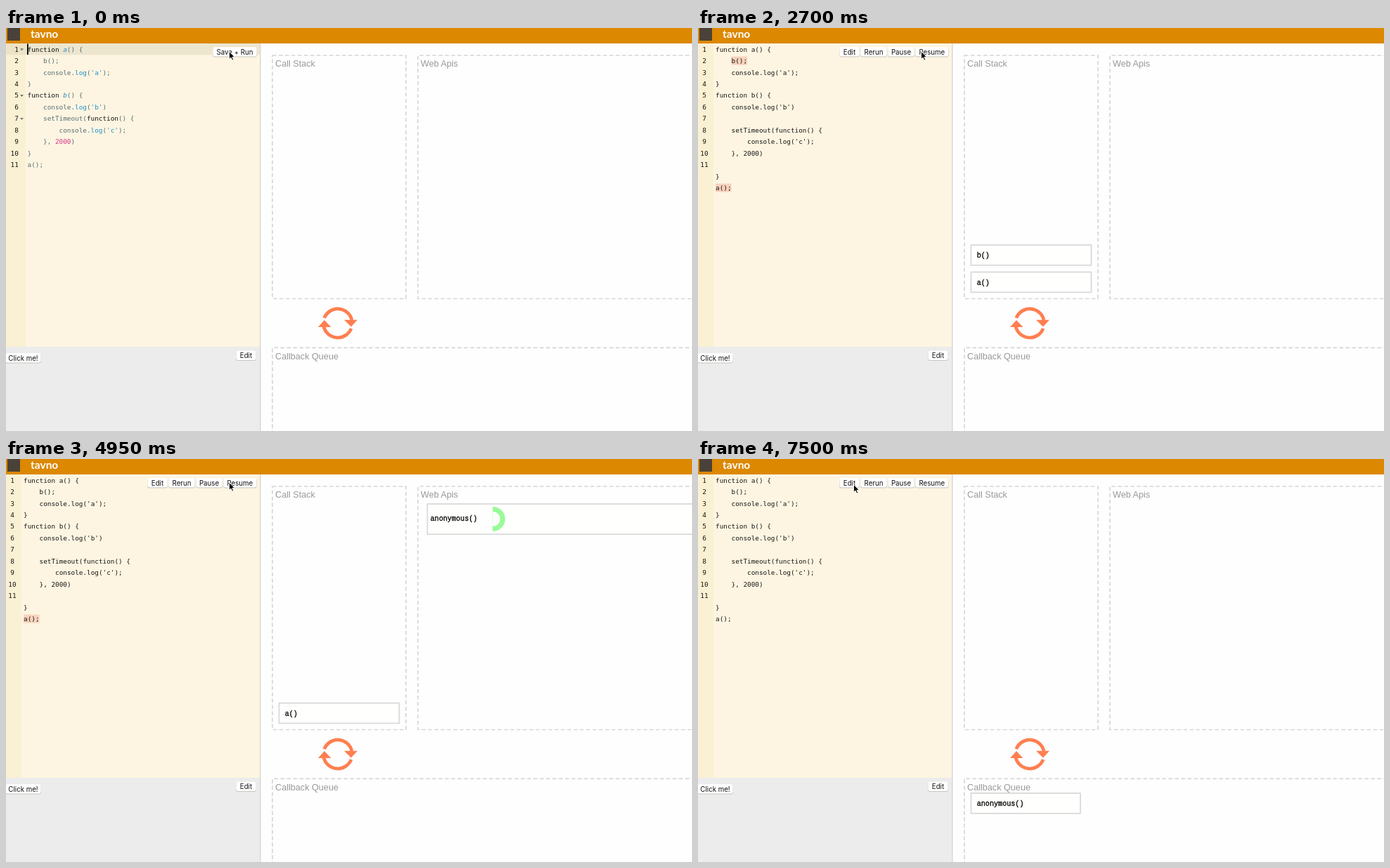
Recreate the animation shown at these times as an HTML page. Size 976 by 574 pixels, loop 8000 ms.

```html
<!DOCTYPE html>
<html lang="en">
<head>
<meta charset="utf-8">
<title>Event loop</title>
<style>
  html, body { margin: 0; width: 976px; height: 574px; overflow: hidden; background: #fefefe; }
  svg { display: block; }
  text { white-space: pre; }
  .code { font: 9.36px "DejaVu Sans Mono", monospace; fill: #151515; }
  .edit { fill: #586e75; }
  .edit .k { fill: #111; }
  .edit .n { fill: #268bd2; font-style: italic; }
  .edit .s { fill: #1f8fd0; }
  .edit .d { fill: #d8308a; }
  .button { font: 9.7px Inter, sans-serif; fill: #111; text-anchor: middle; }
  .title { font: 12.65px "Liberation Sans", Arial, sans-serif; fill: #999; }
  .call { font: 10.15px "Liberation Mono", monospace; fill: #000; stroke: #000; stroke-width: .3; }
  .brand { font: bold 15.5px Lato, sans-serif; fill: #fff; }
  .dashed { fill: none; stroke: #d6d6d6; stroke-width: 1.7; stroke-dasharray: 5.6 3.4; }
  .box { stroke: #d8d8d8; stroke-width: 1.7; }
</style>
</head>
<body>
<svg id="stage" width="976" height="574" viewBox="0 0 976 574"></svg>
<script>
const LOOP = 8000, STEP = 150;
const ROW = 16.45, CHAR = 5.635;
const rowY = i => 30.2 + i * ROW;

const editorCode = [
  "<k>function</k> <n>a</n>() {",
  "    b();",
  "    console.<s>log</s>(<s>'a'</s>);",
  "}",
  "<k>function</k> <n>b</n>() {",
  "    console.<s>log</s>(<s>'b'</s>)",
  "    setTimeout(<k>function</k>() {",
  "        console.<s>log</s>(<s>'c'</s>);",
  "    }, <d>2000</d>)",
  "}",
  "a();"
].map(line => line.replace(/<(\w)>/g, '<tspan class="$1">').replace(/<\/\w>/g, "</tspan>"));

const plainCode = editorCode.map(line => line.replace(/<[^>]+>/g, ""));
plainCode.splice(9, 0, "");
plainCode.splice(6, 0, "");

// marks: [row, first column, last column]; lag: age of the yellow flash on appearing
const calls = [
  { from: 150, to: 7050, lag: 150, y: 347.6, lines: ["a()"], marks: [[12, 0, 4]] },
  { from: 1050, to: 4800, lag: 150, y: 309.1, lines: ["b()"], marks: [[1, 4, 8]] },
  { from: 1800, to: 2550, lag: 300, y: 270.6, lines: ["console.log('b')"], marks: [[5, 4, 20], [7, 0, 4]] },
  { from: 3300, to: 4050, lag: 300, y: 247.2, lines: ["setTimeout(function() {", "console.log('c'); },", "2000)"],
    marks: [[7, 4, 27], [8, 0, 25], [9, 0, 12]] },
  { from: 5550, to: 6150, lag: 150, y: 309.1, lines: ["console.log('a')"], marks: [[2, 4, 21]] },
  { from: 6000, to: LOOP, lag: 0, y: 476, w: 155.5, lines: ["anonymous()"], marks: [] }
];
const TIMER = { from: 4050, to: 6000, start: 3945, span: 2000, x: 692.5, y: 85.5 };

const rect = (x, y, w, h, fill, extra = "") =>
  `<rect x="${x}" y="${y}" width="${w}" height="${h}" fill="${fill}" ${extra}/>`;
const text = (x, y, cls, str) => `<text x="${x}" y="${y}" class="${cls}">${str}</text>`;
const flash = age => `rgb(255,255,${Math.min(253, 210 + age * 0.14)})`;
const active = (item, t) => t >= item.from && t < item.to;

function button(x, y, w, label) {
  return rect(x, y + 0.8, w, 13.4, "#c9c5bd", 'rx="3"') + rect(x + 0.4, y, w - 0.8, 13.3, "#fff", 'rx="3"') +
    text(x + w / 2, y + 10.2, "button", label);
}

function gutterAndCode(t) {
  const editing = t < 150;
  let out = rect(0, 22, editing ? 28 : 22, 432, "#faf0d3");
  if (editing) out += rect(28, 22, 333, 16.4, "#ede6cf") + rect(0, 22, 28, 16.4, "#ede3c6");
  for (let i = 0; i < 11; i++) {
    const n = String(i + 1);
    const x = editing ? 17.8 - n.length * CHAR : 9 - n.length * CHAR / 2;
    out += text(x, rowY(i) + 3.4, "code", n);
  }
  if (!editing) {
    for (const call of calls) if (active(call, t))
      for (const [row, a, b] of call.marks)
        out += rect(25 + a * CHAR, rowY(row) - 6, (b - a) * CHAR, 12, "#f8d2bc");
  }
  const code = editing ? editorCode : plainCode;
  code.forEach((line, i) => out += text(editing ? 30.5 : 25, rowY(i) + 3.4, editing ? "code edit" : "code", line));
  if (editing) {
    for (const i of [0, 4, 6]) out += `<path d="M20 ${rowY(i) - 1}h5l-2.5 3z" fill="#777"/>`;
    out += rect(30, 22.5, 1.8, 15.5, "#000") + button(294, 27.3, 63, "Save + Run");
  } else {
    out += button(201, 27.3, 29, "Edit") + button(231, 27.3, 38, "Rerun") +
      button(270, 27.3, 38, "Pause") + button(309, 27.3, 47.5, "Resume");
  }
  return out;
}

function callBox(call, t) {
  const leaving = t >= call.to && t < call.to + STEP;
  if (!active(call, t) && !leaving) return "";
  const h = 28.8 + (call.lines.length - 1) * 11.7;
  return `<g opacity="${leaving ? 0.35 : 1}">` +
    rect(388.5, call.y, call.w || 171, h, flash(t - call.from + call.lag), 'class="box"') +
    call.lines.map((line, i) => text(396.7, call.y + 18.2 + i * 11.7, "call", line)).join("") + "</g>";
}

function timerBox(t) {
  if (!active(TIMER, t)) return "";
  const { x, y } = TIMER;
  const angle = (t - TIMER.start) / TIMER.span * 2 * Math.PI;
  const sector = (r, fill) => `<path fill="${fill}" d="M${x} ${y}v${-r}A${r} ${r} 0 ${+(angle > Math.PI)} 1
    ${x + r * Math.sin(angle)} ${y - r * Math.cos(angle)}z"/>`;
  return rect(599.5, 64, 400, 43.2, flash(t - TIMER.from), 'class="box"') +
    text(603.8, 88, "call", "anonymous()") +
    `<path d="M${x} ${y - 17.6}a17.6 17.6 0 0 0 0 35.2z" fill="#fefefe"/>` +
    sector(17.6, "#98fb98") + sector(10.6, "#fefefe");
}

function pointer(t) {
  const p = Math.max(0, Math.min(1, (t - 7050) / 450)), e = p * p * (3 - 2 * p);
  return `<path transform="translate(${317.5 - 96 * e} ${33.3 + 3 * e})" d="M0 0V11L2.5 8.7L4.3 12.8L6.2 12L4.4 8H7.8z"
    fill="#000" stroke="#fff" stroke-width=".9"/>`;
}

const backdrop =
  rect(0, 0, 976, 574, "#fefefe") +
  rect(0, 22, 361, 432, "#fdf5e1") + rect(0, 454, 361, 120, "#ececec") + rect(361, 22, 1.6, 552, "#d9d9d9") +
  rect(0, 0, 976, 22, "#dc8800") + rect(2, 0, 18, 18, "#4a4238") + text(35, 14, "brand", "tavno") +
  button(327, 459.8, 29, "Edit") + button(-1, 463.3, 51, "Click me!") +
  '<path class="dashed" d="M379 39H569V385.5H379zM990 39H586V385.5H990M990 455.3H379V590"/>' +
  text(383, 55, "title", "Call Stack") + text(590, 55, "title", "Web Apis") + text(383, 471.5, "title", "Callback Queue") +
  `<path d="M452.9 413A20.5 20.5 0 0 1 492 416M491.1 428A20.5 20.5 0 0 1 452 425"
    fill="none" stroke="#ff7f50" stroke-width="4.8"/>
  <path d="M481 415.8H500L491 425.5zM444 426H462.5L453 416z" fill="#ff7f50"/>`;

const stage = document.getElementById("stage");
let shown = -1;

function frame() {
  const t = Math.min(7500, Math.floor(performance.now() % LOOP / STEP) * STEP);
  if (t !== shown) {
    shown = t;
    stage.innerHTML = backdrop + gutterAndCode(t) + calls.map(call => callBox(call, t)).join("") + timerBox(t) + pointer(t);
  }
  requestAnimationFrame(frame);
}
frame();
</script>
</body>
</html>
```
